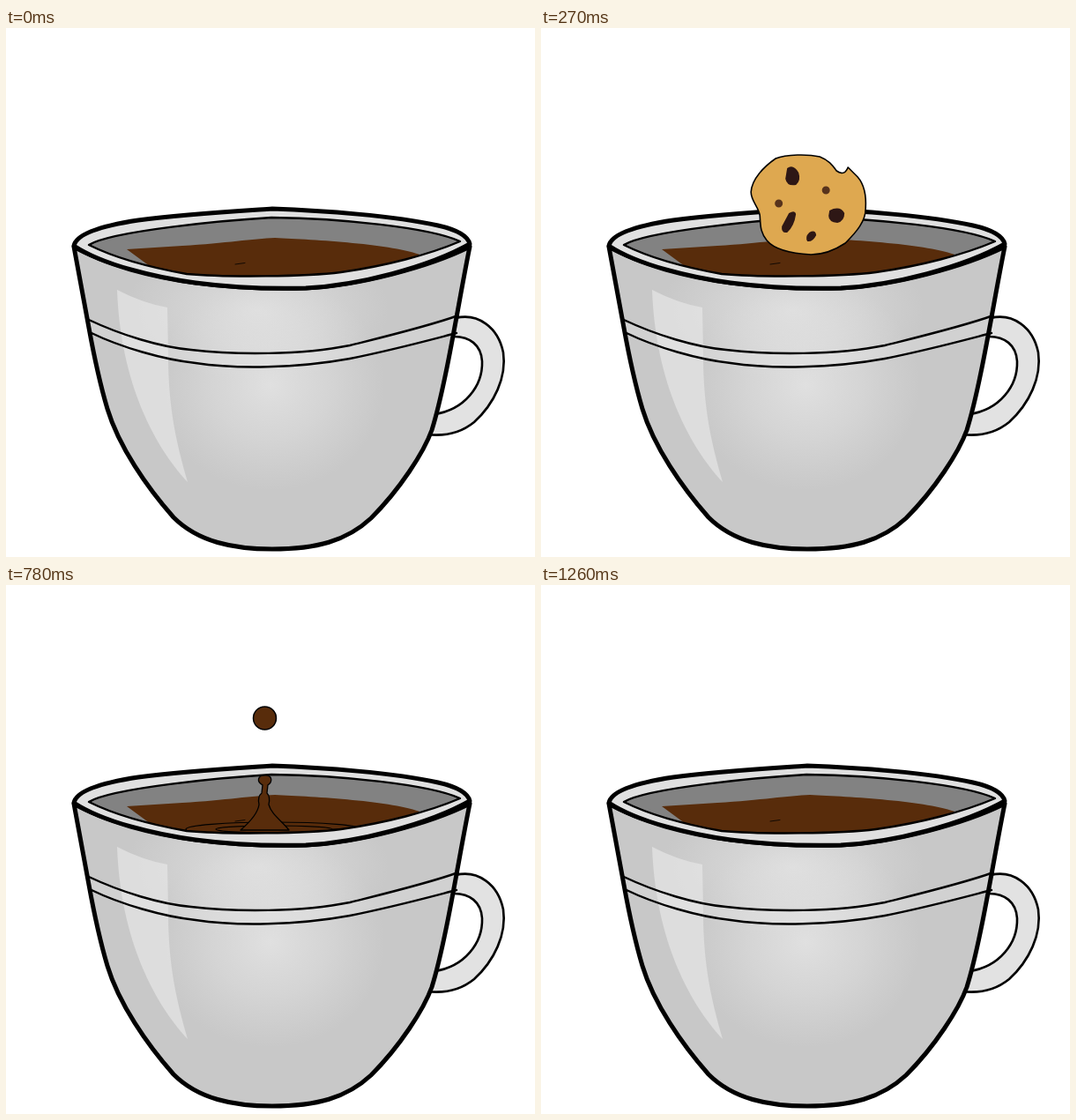
Recreate the animation shown at these times as an HTML page with a canvas. Size 600 px wide and 600 px high, loop 1.5 s.

```html
<!DOCTYPE html>
<html lang="en">
<head>
<meta charset="utf-8">
<title>Cookie dunk</title>
<style>
html, body { margin: 0; width: 100%; height: 100%; overflow: hidden; background: #fff; }
canvas { display: block; width: 600px; height: 600px; }
</style>
</head>
<body>
<canvas id="stage" width="600" height="600"></canvas>
<script>
const ctx = document.getElementById('stage').getContext('2d');
const STEP = 30, LOOP = 1500, LAST = 42;
const COFFEE = '#582c0b', INK = '#000';
const path = d => new Path2D(d);

const FRONT = 'C480 257 430 270 380 277 C340 282 250 283 205 279 C160 271 120 259 94 246';
const cup = {
  body: path('M77 248 L94 340 Q104 395 115 432 C128 475 160 521 190 555 C218 583 258 591 302 591 C352 591 386 582 414 556 C447 523 474 481 483 456 C499 405 513 312 526 248 C480 271 400 292 340 295 C300 296 260 295 215 289 C170 283 110 267 77 248Z'),
  rim: path('M77 247 C80 233 110 224 150 218 C200 211 255 208 302 205 C360 207 440 213 490 224 C512 229 524 236 526 245 C480 271 400 292 340 295 C300 296 260 295 215 289 C170 283 110 269 77 247Z'),
  opening: path('M94 246 C120 230 250 218 301 215 C380 216 480 226 515 242 ' + FRONT + 'Z'),
  coffee: path('M137 251 L200 247 C250 244 280 239 305 238 C350 240 440 245 472 258 L400 290 H190Z'),
  band: path('M94 331 C130 348 175 362 210 365 C260 371 335 371 390 360 C430 350 480 338 515 326 L511 346 C480 354 440 365 390 375 C330 386 260 387 215 380 C178 376 130 362 97 346Z'),
  lines: path('M94 331 C130 348 175 362 210 365 C260 371 335 371 390 360 C430 350 480 338 513 326 M97 346 C130 362 178 376 215 380 C260 387 330 386 390 375 C440 365 480 354 511 346'),
  shine: path('M126 297 Q155 312 183 317 L184 372 C184 430 193 470 206 515 C170 476 130 405 126 297Z'),
  handle: path('M510 329 C535 323 558 339 564 368 C568 396 554 426 531 447 C515 460 495 463 478 461 L486 438 C520 433 541 406 540 378 C539 360 526 349 506 350Z')
};
const aboveFront = path('M0 0 H600 V242 H515 ' + FRONT + 'H0Z');
const aboveDip = path('M0 0 H600 V261 H326 Q294 265 262 261 H0Z');

const cookie = path('M350 49 L361 60 C368 68 371 80 370 96 C370 110 360 122 347 135 C335 143 320 148 308 148 C290 147 268 144 258 132 C250 122 251 115 250 103 C248 93 240 87 240 77 C241 62 255 48 268 39 C280 34 305 34 318 37 C328 41 332 46 337 53 C341 56 345 56 347 54 Q349 52 350 49Z');
const chips = path('M281 50 Q288 45 294 55 Q297 64 291 69 Q281 71 279 62Z M329 98 Q341 92 346 101 Q346 110 338 112 Q328 111 328 104Z M283 101 Q290 97 291 102 Q289 116 281 123 Q274 124 275 116Z M306 123 Q313 119 314 126 Q310 134 304 133 Q301 128 306 123Z');
const crumbs = path('M329.5 75 a4.5 4.5 0 1 1 -9 0 a4.5 4.5 0 1 1 9 0Z M276 90 a4.5 4.5 0 1 1 -9 0 a4.5 4.5 0 1 1 9 0Z');

// Water shapes are relative to the point where they break the surface.
const dent = path('M-122 3 C-119 -10 -106 -17 -95 -18 L-35 -22 L25 -21 L75 -21 C100 -18 128 -9 132 1 M-95 -18 C-75 -7 -50 -8 -38 -7 C-25 -5 10 -5 26 -7 C50 -7 75 -11 88 -18');
const jet = path('M-27 0 C-12 -13 -7 -21 -6 -29 Q-8 -38 -3 -42 L-2 -51 C-9 -55 -8 -62 1 -62 C10 -62 9 -54 4 -51 L3 -42 Q7 -38 5 -29 C8 -18 18 -12 28 0Z');
const pit = path('M-35 4 L-33 -4 C-25 -14 26 -14 33 -4 L33 4 M-32 -7 C-25 -3 -14 -4 -8 -4 C6 -2 20 -3 27 -9');

function paint(shape, fill, width) {
  if (fill) { ctx.fillStyle = fill; ctx.fill(shape); }
  if (width) { ctx.strokeStyle = INK; ctx.lineWidth = width; ctx.stroke(shape); }
}

function scoped(draw, ...clips) {
  ctx.save();
  clips.forEach(c => ctx.clip(c));
  draw();
  ctx.restore();
}

// Scales a shape but keeps its line weight.
function scaled(shape, x, y, sx, sy, fill, width) {
  const p = new Path2D();
  p.addPath(shape, new DOMMatrix([sx, 0, 0, sy, x, y]));
  paint(p, fill, width);
}

function glow(x, y, rx, ry, alpha) {
  ctx.save();
  ctx.translate(x, y);
  ctx.scale(rx, ry);
  const g = ctx.createRadialGradient(0, 0, 0, 0, 0, 1);
  g.addColorStop(0, `rgba(232,232,232,${alpha})`);
  g.addColorStop(0.5, `rgba(228,228,228,${alpha * 0.6})`);
  g.addColorStop(1, 'rgba(226,226,226,0)');
  ctx.fillStyle = g;
  ctx.fillRect(-1, -1, 2, 2);
  ctx.restore();
}

function drawCup() {
  paint(cup.handle, '#e2e2e2', 2.6);
  paint(cup.body, '#c8c8c8');
  scoped(() => {
    glow(300, 405, 130, 120, 0.75);
    glow(285, 320, 150, 80, 0.65);
    paint(cup.band, 'rgba(225,225,225,.35)');
    paint(cup.shine, 'rgba(232,232,232,.65)');
  }, cup.body);
  paint(cup.lines, null, 2.4);
  paint(cup.body, null, 5);
  paint(cup.rim, '#e0e0e0', 5);
  paint(cup.opening, '#828282');
  scoped(() => paint(cup.coffee, COFFEE), cup.opening);
  paint(path('M260 268 L271 266.5'), null, 0.8);
  paint(cup.opening, null, 2.4);
}

function drawCookie(n) {
  if (n > 15) return;
  const fall = n < 9 ? (n - 6) * 109 / 3 : 109 + (n - 9) * 21.4;
  scoped(() => {
    ctx.translate(-fall / 60, fall);
    paint(cookie, '#dea850', 1.6);
    paint(chips, '#2e1715');
    paint(crumbs, '#57331c');
  }, ...(n > 9 ? [aboveDip] : []));
}

function drawDent(n) {
  if (n < 10 || n > 20) return;
  const s = 1 + (n - 14) * 0.09;
  const h = n <= 14 ? 1 : 1 - (n - 14) * 0.12;
  scoped(() => scaled(dent, 300, 268, s, h, null, 1.5), cup.opening, cup.coffee);
}

function drawJet(n) {
  if (n < 20 || n > 33) return;
  const spread = 100 + (n - 26) * 7;
  const rings = new Path2D();
  rings.ellipse(304, 277, spread, 8, 0, 0, Math.PI * 2);
  rings.ellipse(304, 277, spread * 0.66, 4, 0, 0, Math.PI * 2);
  scoped(() => paint(rings, null, 1.2), cup.opening, cup.coffee);

  const h = 1.03 * (1 - ((n - 25) / 6) ** 2);
  if (h > 0) scoped(() => scaled(jet, 293, 278, 0.8 + 0.2 * h, h, COFFEE, 1.3), aboveFront);
}

function drawDrop(n) {
  if (n < 25 || n > 32) return;
  const drop = new Path2D();
  drop.arc(293.5, 81 + 11.2 * (n - 28.5) ** 2, n < 26 ? 9 : 13, 0, Math.PI * 2);
  scoped(() => paint(drop, COFFEE, 1.5), aboveFront);
}

function drawPit(n) {
  if (n < 33 || n > 41) return;
  const s = 1 + (n - 34) * 0.23;
  const h = Math.min(1, 1 - (n - 34) * 0.08);
  scoped(() => {
    ctx.globalAlpha = Math.min(1, (42 - n) / 4);
    scaled(pit, 295, 279, s, h, null, 1.4);
  }, cup.opening, cup.coffee);
}

function render(n) {
  ctx.fillStyle = '#fff';
  ctx.fillRect(0, 0, 600, 600);
  ctx.lineJoin = ctx.lineCap = 'round';
  drawCup();
  [drawDent, drawCookie, drawJet, drawDrop, drawPit].forEach(draw => draw(n));
}

let start, shown = -1;
function tick(now) {
  start ??= now;
  const n = Math.min(LAST, Math.floor(((now - start) % LOOP) / STEP));
  if (n !== shown) render(shown = n);
  requestAnimationFrame(tick);
}
render(0);
requestAnimationFrame(tick);
</script>
</body>
</html>
```
